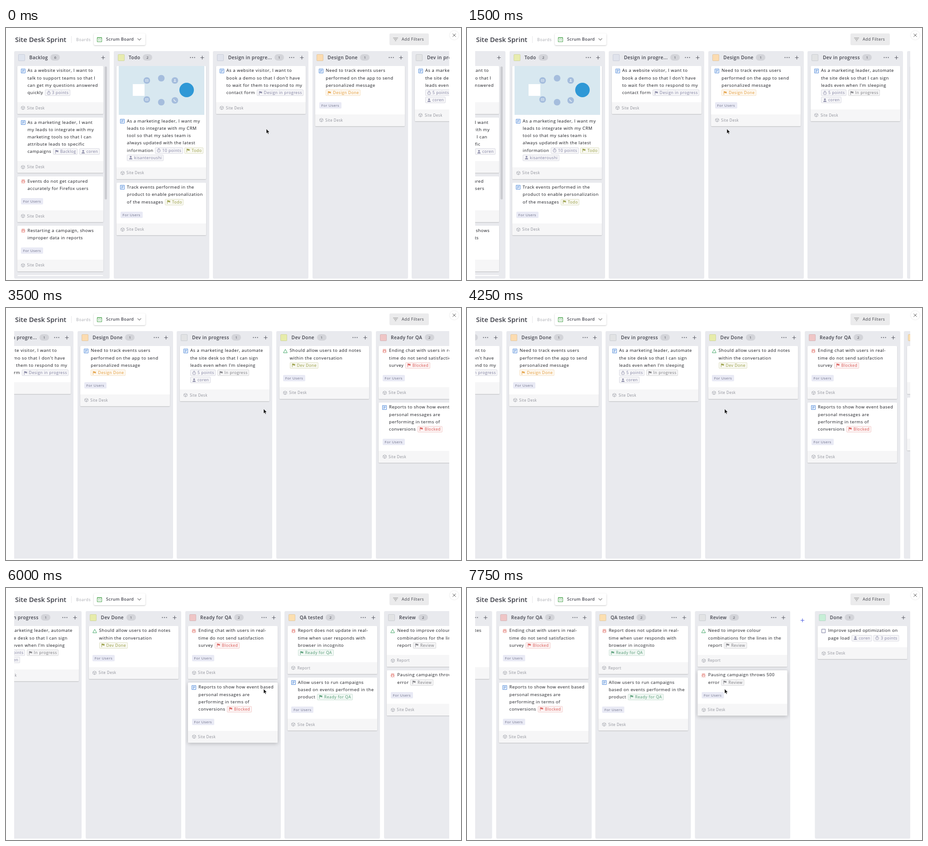
An HTML page that plays this animation: 1005x557 px, repeating every 8750 ms.

```html
<!DOCTYPE html>
<html lang="en">
<head>
<meta charset="utf-8">
<title>Sprint board</title>
<style>
  * { box-sizing: border-box; }
  html, body { margin: 0; width: 100%; height: 100%; overflow: hidden; background: #fff; }
  body { position: relative; font: 9.5px/16.2px "Open Sans", sans-serif; letter-spacing: .55px; color: #15161c; white-space: nowrap; }
  svg { display: block; flex: none; fill: none; stroke: currentColor; overflow: visible; }
  .abs { position: absolute; }
  .bar { position: absolute; top: 12px; height: 26px; display: flex; align-items: center; border-radius: 3px; }
  h1 { position: absolute; left: 20px; top: 13px; margin: 0; font-size: 14.8px; line-height: 24px; font-weight: 600; letter-spacing: .05px; color: #3b3c45; }
  .picker { left: 194px; width: 114px; padding-left: 7px; font-size: 9.2px; font-weight: 600; letter-spacing: .4px; color: #44454f; box-shadow: 0 1px 3px rgba(0,0,0,.24); }
  .filters { left: 847px; width: 87px; padding-left: 8px; font-size: 8.9px; letter-spacing: .5px; background: #ebebec; color: #3e3f46; }
  .close { left: 980px; top: 6px; width: 20px; height: 20px; border-radius: 50%; box-shadow: 0 0 2px rgba(0,0,0,.2); padding: 6px; color: #555; }
  .view { left: 18px; top: 51px; width: 961px; height: 506px; overflow: hidden; }
  .board { left: 0; top: 0; will-change: transform; }
  .column { position: absolute; width: 211px; height: 503px; background: #e9eaee; border-radius: 3px; }
  .head { position: absolute; left: 9px; top: 6px; height: 16px; display: flex; align-items: center; font-size: 10.2px; font-weight: 600; letter-spacing: .42px; color: #3f404a; }
  .swatch { width: 15px; height: 15px; margin-right: 9.5px; border: 1px solid rgba(60,70,100,.14); border-radius: 2px; }
  .count { width: 21px; height: 14px; margin-left: 5.5px; border-radius: 7px; background: #d3d4d9; font: 8px/14px "Open Sans", sans-serif; letter-spacing: 0; text-align: center; color: #44454d; }
  .dots { left: 168px; top: 13px; color: #666770; }
  .plus { left: 191.5px; top: 9.5px; color: #5c5d66; }
  .list { position: absolute; top: 33px; width: 211px; height: 464px; overflow: hidden; }
  .card { position: relative; width: 198px; margin: 0 0 8.4px 6.5px; background: #fff; border-radius: 2px; box-shadow: 0 1px 2px rgba(0,0,0,.2); }
  .card.hover { box-shadow: 0 2px 8px rgba(0,0,0,.22); }
  .narrow .card { width: 190px; }
  .scrollbar { left: 200px; top: 34px; width: 5px; height: 294px; border-radius: 3px; background: #cbccd1; }
  .text { position: relative; padding: 2.4px 0 12.6px 23px; }
  .text > svg { position: absolute; left: 8px; top: 5.6px; }
  .line { display: flex; align-items: center; height: 16.2px; gap: 3.5px; }
  .tag { display: flex; align-items: center; height: 14px; padding: 0 2.5px 0 3px; gap: 3px; border: 1px solid; border-radius: 2px; font-size: 8.7px; letter-spacing: .52px;
    color: var(--c); border-color: color-mix(in srgb, var(--c) 28%, #fff); background: color-mix(in srgb, var(--c) 7%, #fff); }
  .tag svg { opacity: .85; }
  .users { width: 49px; height: 14px; margin: .6px 0 12.4px 8.5px; border-radius: 2px; background: #e9eaf5; color: #6b6d85; font-size: 8px; line-height: 14px; letter-spacing: .45px; text-align: center; }
  .foot { display: flex; align-items: center; gap: 4.5px; height: 26px; padding-left: 8.5px; background: #f6f6f7; color: #8a8c95; font-size: 8.1px; letter-spacing: .5px; border-radius: 0 0 2px 2px; }
  .cover { margin: 0 auto 3.4px 5px; background: #d8e8f0; }
</style>
</head>
<body>
<h1>Site Desk Sprint</h1>
<div class="abs" style="left:144px;top:18px;width:1px;height:15px;background:#e6e6e8"></div>
<div class="bar" style="left:155px;top:13px;font-size:8.8px;color:#a6a7ad">Boards</div>
<div class="bar picker">
  <svg width="11" height="11" style="margin-right:9px;color:#43a047"><path d="M.5 1h10v9.5H.5zM.5 2h10M4.5 4.5 3 6.3 4.5 8M6.5 4.5 8 6.3 6.5 8"/></svg>
  Scrum Board
  <svg class="abs" style="left:96px;top:10px;color:#777" width="9" height="6"><path d="m.5.8 4 4 4-4" stroke-width="1.2"/></svg>
</div>
<div class="bar filters">
  <svg width="11" height="8" style="margin-right:8px;color:#888"><path d="M0 1h11M2 4h7M4 7h3"/></svg>Add Filters
</div>
<div class="abs close"><svg width="8" height="8"><path d="m.5.5 7 7m0-7-7 7"/></svg></div>
<div class="abs view"><div class="abs board" id="board"></div></div>
<svg class="abs" id="cursor" style="top:223px" width="8" height="13"><path d="M0 0v10.2l2.3-2.1 1.5 3.5 1.7-.7L4 7.5h3.2z" fill="#111" stroke="#fff" stroke-width=".6"/></svg>

<script>
const LOOP = 8750, PITCH = 219.6, CURSOR_Y = 223;

const icon = (paths, color = 'currentColor', size = 10) =>
  `<svg width="${size}" height="${size}" viewBox="0 0 10 10" style="color:${color}">${paths}</svg>`;
const person = '<path d="M1 9.3c0-4.6 8-4.6 8 0z" fill="currentColor" stroke="none"/><circle cx="5" cy="2.9" r="2.2" fill="currentColor" stroke="none"/>';
const icons = {
  story: icon('<path d="M.6.6h8.8v8.8H.6zM2.5 3h5M2.5 5h5M2.5 7h3"/>', '#4a86d8'),
  bug: icon('<path stroke-width=".85" d="M3 3.5c0-2.6 4-2.6 4 0v3.2c0 3-4 3-4 0zM3 4h4M3 5.5H.3M7 5.5h2.7M3 3.6 1 2M7 3.6 9 2M3.1 7.3 1 9M6.9 7.3 9 9M3.8 1.8 2.8.4M6.2 1.8l1-1.4"/>', '#dd5f56'),
  idea: icon('<path d="M5 1.3 9.3 9H.7z"/>', '#3fa564'),
  task: icon('<path d="M1 1h8v8H1z"/>', '#6e7197'),
  cube: icon('<path d="m5 .6 4 2.1v4.6L5 9.4 1 7.3V2.7zM1 2.7l4 2.1 4-2.1M5 4.8v4.6" stroke-width=".9"/>', '#999ba4', 9),
  clock: icon('<circle cx="5" cy="5.6" r="3.7"/><path d="M3.5.6h3M5 3.6v2.2"/>', undefined, 9),
  flag: icon('<path d="M1.5.7v9"/><path d="M2 1h3l.7 1H9L8 3.8l1 1.9H5.4L4.8 5H2z" fill="currentColor" stroke="none"/>', undefined, 9),
  user: icon(person, undefined, 9)
};
const plus = icon('<path d="M5 .5v9M.5 5h9" stroke-width="1.3"/>', undefined, 9);

const tones = { Todo: '#949a3c', 'Dev Done': '#949a3c', 'Design Done': '#e39a35', 'In progress': '#77777b',
  Review: '#77777b', Blocked: '#d9534f', 'Ready for QA': '#4a966c' };

function tag(label) {
  const kind = label[0] === '@' ? 'user' : label.endsWith('points') ? 'clock' : 'flag';
  return `<span class="tag" style="--c:${tones[label] || '#7b7b9c'}">${icons[kind]}${label.replace('@', '')}</span>`;
}

// Cover art: plain shapes joined by a ring of small round badges.
function cover() {
  const badge = (x, y, glyph = '') => `<g transform="translate(${x} ${y})"><circle r="7.3" fill="#a5bddd"/>${glyph}</g>`;
  const mail = '<path d="M-3-2h6v4.4h-6zM-3-2 0 .8 3-2" stroke="#e6eff7" stroke-width=".9"/>';
  const face = `<g transform="translate(-3.2 -3.4) scale(.65)" color="#e6eff7">${person}</g>`;
  const phone = '<path d="M-2.3-2.6C-2 .3-.3 2 2.6 2.4" stroke="#e6eff7" stroke-width="1.5"/>';
  return `<svg class="cover" width="189" height="108" stroke="none">
    <rect x="31" y="40" width="26" height="26" fill="#fff" stroke="none"/>
    <circle cx="150" cy="53" r="16" fill="#2f98d6" stroke="none"/><g stroke="none">
    ${badge(62, 32, mail)}${badge(94, 27)}${badge(124, 32, face)}
    ${badge(62, 74, mail)}${badge(94, 80)}${badge(124, 76, phone)}</g></svg>`;
}

// Card: [icon, lines with [tags], options]
const columns = [
  ['Backlog', 6, '#dfe4ee', [
    ['story', 'As a website visitor, I want to|talk to support teams so that I|can get my questions answered|quickly [3 points]'],
    ['story', 'As a marketing leader, I want|my leads to integrate with my|marketing tools so that I can|attribute leads to specific|campaigns [Backlog][@coren]'],
    ['bug', 'Events do not get captured|accurately for Firefox users', { users: 1 }],
    ['bug', 'Restarting a campaign, shows|improper data in reports', { users: 1 }],
    ['bug', '']]],
  ['Todo', 2, '#e8ecae', [
    ['story', 'As a marketing leader, I want my|leads to integrate with my CRM|tool so that my sales team is|always updated with the latest|information [10 points][Todo]|[@kisanteroushi]', { art: 1 }],
    ['story', 'Track events performed in the|product to enable personalization|of the messages [Todo]', { users: 1 }]]],
  ['Design in progre...', 1, '#e0e3ec', [
    ['story', "As a website visitor, I want to|book a demo so that I don't have|to wait for them to respond to my|contact form [Design in progress]"]]],
  ['Design Done', 1, '#fcdcb0', [
    ['story', 'Need to track events users|performed on the app to send|personalized message|[Design Done]', { users: 1 }]]],
  ['Dev in progress', 1, '#e2e3e4', [
    ['story', "As a marketing leader, automate|the site desk so that I can sign|leads even when I'm sleeping|[5 points][In progress]|[@coren]"]]],
  ['Dev Done', 1, '#e7ecaa', [
    ['idea', 'Should allow users to add notes|within the conversation|[Dev Done]', { users: 1 }]]],
  ['Ready for QA', 2, '#efc6c6', [
    ['bug', 'Ending chat with users in real-|time do not send satisfaction|survey [Blocked]', { users: 1 }],
    ['story', 'Reports to show how event based|personal messages are|performing in terms of|conversions [Blocked]', { users: 1 }]]],
  ['QA tested', 2, '#fcdfb0', [
    ['bug', 'Report does not update in real-|time when user responds with|browser in incognito|[Ready for QA]', { foot: 'Report' }],
    ['story', 'Allow users to run campaigns|based on events performed in the|product [Ready for QA]', { users: 1 }]]],
  ['Review', 2, '#e2e3e4', [
    ['idea', 'Need to improve colour|combinations for the lines in the|report [Review]', { foot: 'Report' }],
    ['bug', 'Pausing campaign throws 500|error [Review]', { users: 1 }]]],
  ['Done', 1, '#c8efd7', [
    ['task', 'Improve speed optimization on|page load [@coren][3 points]']]]
];

function card([kind, text, { users, art, foot = 'Site Desk' } = {}]) {
  const lines = text.split('|').map(line =>
    `<div class="line">${line.replace(/ ?\[(.+?)\]/g, (_, label) => tag(label))}</div>`).join('');
  return `<div class="card">${art ? cover() : ''}<div class="text">${icons[kind]}${lines}</div>
    ${users ? '<div class="users">For Users</div>' : ''}
    <div class="foot">${icons.cube}${foot}</div></div>`;
}

function column([title, count, color, cards], i) {
  const first = i === 0, last = i === columns.length - 1;
  const left = i * PITCH + (last ? 45.2 : 0);
  const dots = '<svg class="abs dots" width="12" height="3"><path d="M.5 1.2h2M5 1.2h2M9.5 1.2h2" stroke-width="2"/></svg>';
  return `<div class="column ${first ? 'narrow' : ''}" style="left:${left}px">
    <div class="head"><i class="swatch" style="background:${color}"></i>${title}<span class="count">${count}</span></div>
    ${first || last ? '' : dots}<div class="abs plus">${plus}</div>
    <div class="list">${cards.map(card).join('')}</div>
    ${first ? '<div class="abs scrollbar"></div>' : ''}</div>`;
}

const board = document.getElementById('board');
const cursor = document.getElementById('cursor');
board.innerHTML = columns.map(column).join('') +
  '<div class="abs" style="left:1990px;top:15.5px;color:#4a5be0">' + plus + '</div>';
const cards = [...board.querySelectorAll('.card')];

// Swipes, as [first step in ms, scroll position at each following 250 ms step]
const swipes = [
  [1000, 50, 118, 144],
  [2000, 205, 285, 312],
  [3000, 375, 475, 519, 530],
  [4250, 590, 690, 735],
  [5250, 804.5, 880, 925, 940],
  [6500, 1040, 1150, 1205, 1240, 1262, 1271.6]
];

function scrollAt(t) {
  const swipe = swipes.findLast(([start]) => t >= start);
  if (!swipe) return 0;
  const step = 1 + Math.floor((t - swipe[0]) / 250);
  return swipe[Math.min(step, swipe.length - 1)];
}

function draw() {
  const t = performance.now() % LOOP;
  const x = t < 1000 ? 575 : t < 2000 ? 574 : 569;
  board.style.transform = `translateX(${-scrollAt(t)}px)`;
  cursor.style.left = x + 'px';
  for (const el of cards) {
    const r = el.getBoundingClientRect();
    el.classList.toggle('hover', r.left < x && x < r.right && r.top < CURSOR_Y && CURSOR_Y < r.bottom);
  }
  requestAnimationFrame(draw);
}
draw();
</script>
</body>
</html>
```
